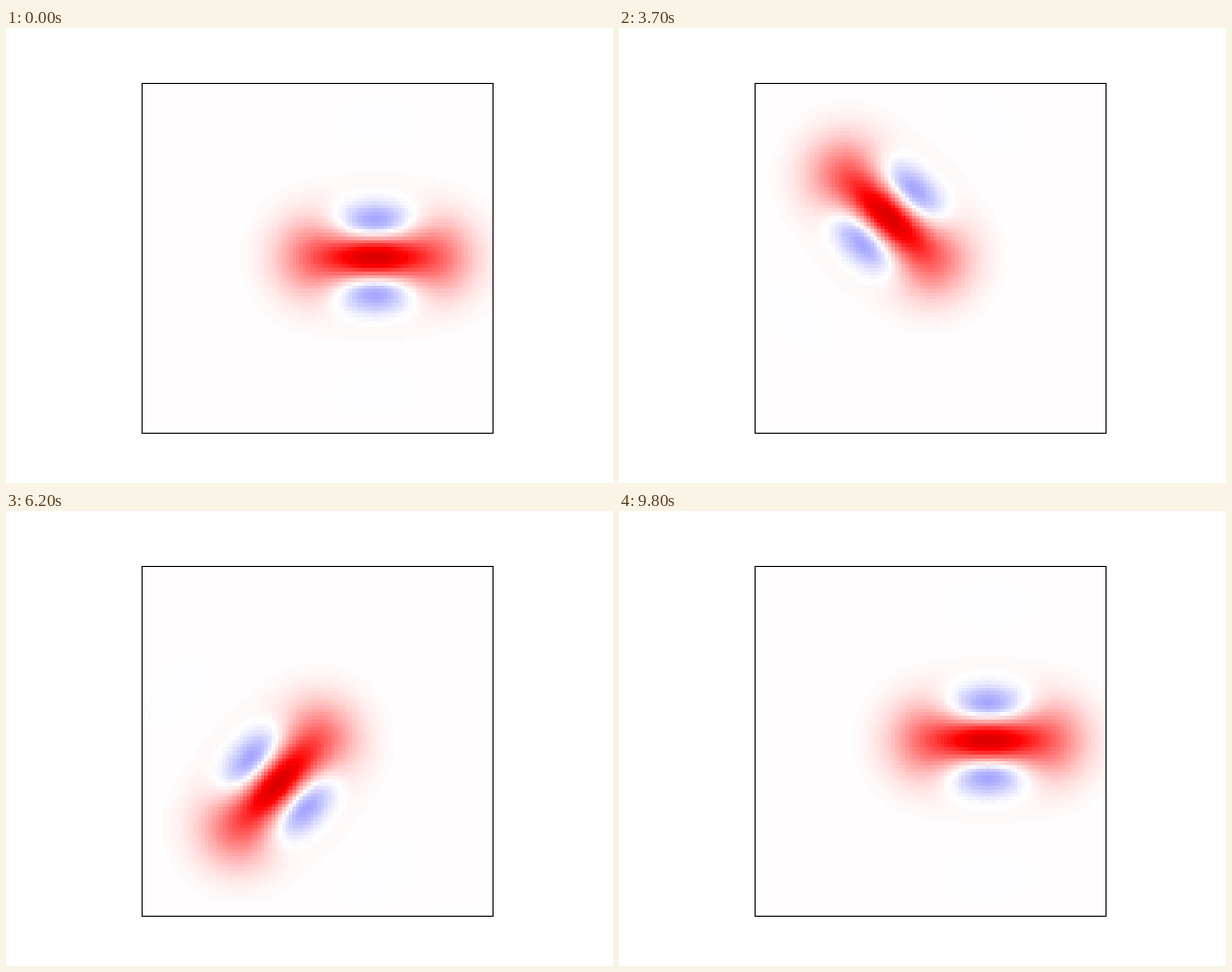
Animation of 640x480 px, one loop 9.9 s. Source, as a matplotlib script:

```python
import numpy as np
import matplotlib.pyplot as plt
from matplotlib.animation import FuncAnimation

FRAMES = 99
ALPHA = 2.0    # amplitude of the orbiting coherent state
LIMIT = 3.0

axis = np.linspace(-LIMIT, LIMIT, 100)
re, im = np.meshgrid(axis, axis)


def wigner(angle):
    """Wigner function of the vacuum superposed with a coherent state at angle."""
    c, s = np.cos(angle), np.sin(angle)
    along = re * c + im * s
    across = im * c - re * s

    def blob(offset):
        return np.exp(-2 * ((along - offset) ** 2 + across ** 2))

    fringes = 2 * blob(ALPHA / 2) * np.cos(2 * ALPHA * across)
    norm = np.pi * (1 + np.exp(-ALPHA ** 2 / 2))
    return (blob(0) + blob(ALPHA) + fringes) / norm


fig, ax = plt.subplots(figsize=(6.4, 4.8), dpi=100)
ax.set(xticks=[], yticks=[])
image = ax.imshow(wigner(0), cmap="seismic", vmin=-1, vmax=1, origin="lower",
                  extent=(-LIMIT, LIMIT, -LIMIT, LIMIT), interpolation="nearest")
ax.set(xticks=[], yticks=[])


def update(frame):
    image.set_data(wigner(2 * np.pi * frame / (FRAMES - 1)))
    return [image]


anim = FuncAnimation(fig, update, frames=FRAMES, interval=100,
                     repeat=True, repeat_delay=0)
plt.show()
```
